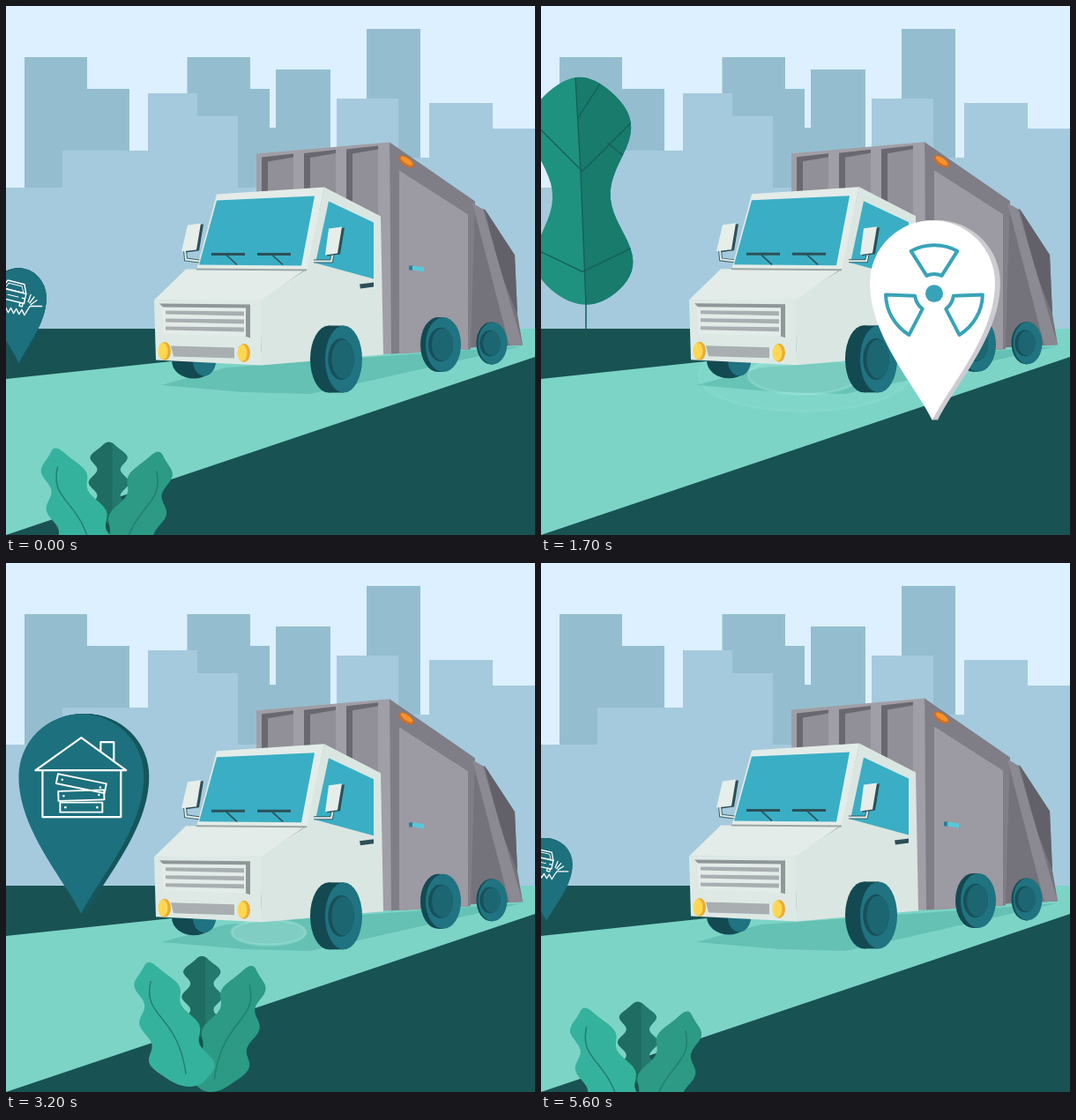
An HTML page with a canvas that plays this animation: 600 px wide and 600 px high, repeating every 5.7 s.

```html
<!DOCTYPE html>
<html lang="en">
<head>
<meta charset="utf-8">
<title>Garbage truck</title>
<style>
html,body{margin:0;width:100%;height:100%;overflow:hidden;background:#dcf0ff}
canvas{display:block;width:600px;height:600px}
</style>
</head>
<body>
<canvas id="stage"></canvas>
<script>
const LOOP = 5700, HALF = LOOP / 2, STEP = 100, TAU = Math.PI * 2;
const cv = document.getElementById('stage'), c = cv.getContext('2d');
const dpr = window.devicePixelRatio || 1;
cv.width = cv.height = 600 * dpr;

// ---------- helpers ----------
const { sin, cos, pow, exp, sqrt, abs, min, max, PI } = Math;
const mod = (a, n) => ((a % n) + n) % n;
const part = (a, b, t) => min(1, max(0, (t - a) / (b - a)));
const ease = (a, b, t) => { const p = part(a, b, t); return p * p * (3 - 2 * p); };
// Time within half a loop, counted from `from`
const phase = (t, from) => mod(t - from, HALF) + from;

function trace(pts, close = true) {
  c.beginPath();
  for (let i = 0; i < pts.length; i += 2) c.lineTo(pts[i], pts[i + 1]);
  if (close) c.closePath();
}
function poly(color, ...pts) { trace(pts); c.fillStyle = color; c.fill(); }
function rect(color, x, y, w, h) { c.fillStyle = color; c.fillRect(x, y, w, h); }
function stroke(color, w) { c.strokeStyle = color; c.lineWidth = w; c.stroke(); }
function line(color, w, ...pts) { trace(pts, false); stroke(color, w); }
function box(color, w, x, y, bw, bh) { c.beginPath(); c.rect(x, y, bw, bh); stroke(color, w); }
function oval(color, x, y, rx, ry = rx) {
  c.beginPath(); c.ellipse(x, y, rx, ry, 0, 0, TAU);
  c.fillStyle = color; c.fill();
}
// Run `fn` in its own coordinates
function at(x, y, sx, sy, fn, turn = 0) {
  c.save(); c.translate(x, y); c.rotate(turn); c.scale(sx, sy); fn(); c.restore();
}
// Leaf outline from top (v = 0) to bottom (v = 1): centre and half width by v
function leaf(color, height, centre, half, round) {
  const N = 48, left = [], right = [];
  for (let i = 0; i <= N; i++) {
    const v = (1 - cos(PI * i / N)) / 2, y = (v - 1) * height;
    const w = half(v) * sqrt(max(0, 1 - pow(2 * v - 1, round)));
    left.push(centre(v) - w, y);
    right.unshift(centre(v) + w, y);
  }
  poly(color, ...left, ...right);
}

// ---------- background ----------
// Steps: each x, y gives the roof height from there on
function skyline(color, ...steps) {
  const pts = [steps[0], 367];
  for (let i = 0; i < steps.length; i += 2)
    pts.push(steps[i], steps[i + 1], steps[i + 2] ?? 600, steps[i + 1]);
  poly(color, ...pts, 600, 367);
}
function scenery() {
  rect('#dcf0ff', 0, 0, 600, 600);
  skyline('#94becf', 21, 58, 92, 94, 140, 215, 205.5, 58, 277, 94, 299, 138, 306, 72, 368, 215, 409, 26, 470, 215);
  skyline('#a5cadd', 0, 206, 64, 164, 161, 99, 217, 125, 263, 206, 375, 105, 445, 172, 480, 110, 552, 139);
  rect('#195253', 0, 366, 600, 234);
  poly('#7cd4c7', 0, 423, 535, 366, 600, 366, 600, 398, 0, 600);
  poly('#65c1b4', 176, 430, 250, 410, 585, 386, 400, 428, 345, 440, 270, 438);
}

// Four waves in a row spread out under the bonnet
function pulses(t) {
  for (let i = 0; i < 4; i++) {
    const age = phase(t, 0) - 50 - 400 * i, life = 1150;
    if (age <= 0 || age >= life) continue;
    const r = age * .14, fade = 1 - age / life;
    c.globalAlpha = .5 * fade * fade;
    oval('#c8f0e8', 298, 419, r, r * .34);
    c.globalAlpha = .4 * fade;
    stroke('#b5eee4', 3);
  }
  c.globalAlpha = 1;
}

// ---------- tree ----------
function tree(t, start, x) {
  const p = part(start, start + 500, t) - 1, q = part(start + 500, start + 970, t);
  const s = (1 + 2 * p * p * p + p * p) * (1 - q * q);
  if (s < .01) return;
  const shape = color => leaf(color, 256, v => -7 + 7 * v * v, v => 47 + 14.5 * cos(TAU * (v - .18) / .68), 4);
  const ink = '#165f5c';
  at(x, 367, s, s, () => {
    line('#1a5c5d', 1.5, 0, -30, 0, 0);
    c.translate(0, -28);
    shape('#1f917f');
    c.clip();
    poly('#187b6c', -12, -260, 70, -260, 70, 0, 0, 0, -6, -150);
    line(ink, 1.4, -12, -258, -6, -150, 0, 0);
    for (const [y, rise] of [[-150, 62], [-37, 30]])
      for (const side of [-1, 1]) line(ink, 1.4, -4, y, side * 62 - 4, y - rise);
    line(ink, 1.4, -9, -210, 20, -255);
    line(ink, 1.4, 24, -182, 54, -158);
  });
}

// ---------- map pins (tip at 0,0) ----------
function pinShape() {
  c.beginPath(); c.moveTo(0, 0);
  c.bezierCurveTo(-18, -38, -71, -95, -71, -156);
  c.arc(0, -156, 71, PI, TAU);
  c.bezierCurveTo(71, -95, 18, -38, 0, 0);
}
function pin(x, y, s, turn, face, side, icon) {
  if (s < .01) return;
  const w = cos(turn), depth = 6 * w - 9 * sin(turn);
  const squeeze = abs(w) < .03 ? .03 : w;
  at(x, y, s, s, () => {
    for (let i = 6; i >= 0; i--) at(depth * i / 6, 0, squeeze, 1, () => {
      pinShape();
      c.fillStyle = i ? side : face; c.fill();
      if (!i) { c.lineCap = c.lineJoin = 'round'; icon(); }
    });
  });
}

function crashIcon() {
  const k = '#fff';
  // tilted car
  at(15, -164, 1, 1, () => {
    box(k, 3.2, -32, -9, 64, 24);
    line(k, 3.2, -32, -9, -23, -30, 21, -30, 32, -9);
    line(k, 2, -25, -10, -18, -24, 17, -24, 25, -10, -25, -10);
    line(k, 2, -14, 3, 14, 3);
    for (const side of [-1, 1]) {
      line(k, 3, side * 24, 3, side * 30, 3);
      box(k, 3, side * 25 - 4, 15, 8, 8);
    }
  }, -.22);
  // broken ground and sparks
  const crack = [-59, -136, -28, -136];
  for (let i = 0; i < 9; i++) crack.push(-21 + 7 * i, (i % 2 ? -114 : -126) - i);
  line(k, 3, ...crack, 48, -134);
  for (let i = 0; i < 3; i++) {
    const a = PI + .6 + .3 * i, x = -18, y = -130;
    line(k, 3, x + 15 * cos(a), y + 18 * sin(a), x + 34 * cos(a), y + 36 * sin(a));
  }
}
function houseIcon() {
  const k = '#fff';
  line(k, 2.2, -52, -163, 0, -200, 51, -163, -52, -163);
  line(k, 2.2, -44, -162, -44, -110, 45, -110, 45, -162);
  line(k, 2.2, 22, -185, 22, -195, 37, -195, 37, -174);
  for (let i = 0; i < 3; i++) at(0, -148 + 13.5 * i, 1, 1, () => {
    const w = 56 - 4 * i;
    box(k, 1.9, -w / 2, -5.5, w, 11);
    for (const side of [-1, 1]) oval(k, side * (w / 2 - 6), 0, 1.3);
  }, [.2, -.03, 0][i]);
}
function hazardIcon() {
  const k = '#38a3b8', spread = .5;
  oval(k, 2, -144, 10);
  for (let i = 0; i < 3; i++) {
    const a = -PI / 2 + i * TAU / 3;
    c.beginPath();
    c.arc(2, -144, 55, a - spread, a + spread);
    c.arc(2, -144, 22, a + spread * .8, a - spread * .8, true);
    c.closePath(); stroke(k, 4);
  }
}
function sprayIcon() {
  const k = '#319fb6';
  box(k, 5, -13, -156, 50, 67);
  line(k, 5, -11, -157, -2, -170, 26, -170, 35, -157);
  rect(k, 2, -186, 20, 13);
  for (let i = 0; i < 4; i++) oval(k, -16 - 8 * i, -181 + 4 * sin(2.4 * i), 5 + 2 * i, 4 + 1.6 * i);
}

// Rolls up along the far kerb in perspective, hops once, then shrinks away
function tealPin(t) {
  const u = phase(t, -700), near = 1 / max(1, 2.1 - u * .00314);
  const q = part(850, 1100, u), hop = part(380, 780, u);
  const x = 85.5 - 135 * (1 - near) + 12 * q, y = 398 + 14 * (1 - near) - 75 * sin(PI * hop);
  const turn = PI * (1 + ease(-100, 350, u)) + TAU * ease(380, 780, u) + 2 * q;
  pin(x, y, near * (1 - q * q), turn, '#1d707d', '#16565c',
    mod(t + 700, LOOP) < HALF ? crashIcon : houseIcon);
}
// Spins in along the near kerb, rests, then spins off
function whitePin(t) {
  const u = phase(t, 765), left = 1 - part(765, 1727, u), q = part(2150, 2600, u);
  const x = 444 - 394 * pow(left, 2.6) + 65 * q * q;
  pin(x, 470 - .357 * (x - 444), (1 - left * left) * (1 - q * q),
    6 * pow(left, 4) + 2.3 * q, '#fff', '#cdccd1',
    mod(t - 765, LOOP) < HALF ? hazardIcon : sprayIcon);
}

// ---------- plant (base at 0,0) ----------
function plantLeaf(color, lean, height, width, grow) {
  leaf(color, height, v => lean * (58 - 46 * v), v => width + grow * v + 5 * cos(TAU * (v - .18) / .32), 4);
  if (!lean) return;
  c.beginPath(); c.moveTo(lean * 56, -height * .85);
  c.bezierCurveTo(lean * 66, -height * .55, lean * 26, -height * .6, lean * 16, -height * .1);
  stroke('#217f76', 1.5);
}
function plant(t) {
  const u = phase(t, -700);
  const x = 110 + .04 * u + 418 / (1 + exp((478 - u) / 106));
  const y = 600 - .46 * (x - 220) + 300 * (1 - ease(-650, -100, u));
  const s = min(1, (640 - x) / 194) * (1 - ease(1200, 1600, u));
  if (s < .01) return;
  at(x, y, s, s, () => {
    at(2, -62, 1, 1, () => {
      plantLeaf('#1f6c63', 0, 92, 18, 0);
      c.clip();
      rect('#24796e', 4, -100, 40, 100);
    });
    plantLeaf('#2c9a85', 1, 143, 19, 17);
    at(0, -6, 1, 1, () => plantLeaf('#35b29d', -1, 141, 19, 20));
  });
}

// ---------- truck ----------
function wheel(x, y, rx, ry, depth) {
  const tread = '#134a52';
  oval(tread, x - depth, y, rx, ry);
  rect(tread, x - depth, y - ry, depth, 2 * ry);
  oval('#207380', x, y, rx, ry);
  oval('#174f5a', x - 3, y, rx * .7, ry * .62);
  oval('#1c6672', x - 1, y, rx * .6, ry * .58);
}
function container() {
  const frame = '#a09ea6', shade = '#7f7d86', deep = '#696870';
  poly('#74737b', 525, 232, 543, 231, 577, 283, 580, 350, 586, 385, 526, 388);
  poly('#62616a', 543, 231, 577, 283, 580, 350, 560, 300);
  poly(frame, 284, 168, 435, 155, 438, 395, 300, 395, 284, 212);
  poly(shade, 435, 155, 532, 222, 527, 390, 437, 395);
  poly('#9c9aa3', 446, 187, 524, 237, 524, 390, 446, 395);
  poly('#8b8992', 529, 224, 541, 231, 586, 385, 571, 386);
  for (let i = 0; i < 3; i++) {
    const x = 290 + 48 * i, y = 172 - 4.5 * i, x2 = x + 36;
    poly(deep, x, y, x2, y - 4, x2, 245, x, 235);
    poly('#918f97', x + 7, y + 5, x2, y, x2, 245, x + 7, 235);
  }
  at(454, 177, 1, 1, () => { oval('#ce6f23', 0, 0, 10, 5); oval('#f6922e', 0, -1, 8, 3); }, .6);
  rect('#2a7f93', 457, 295, 5, 5);
  poly('#58c8d9', 461, 295, 474, 297, 474, 302, 461, 300);
}
function mirror(x, y, lean) {
  const ink = '#2c5058';
  poly(ink, x + 2, y, x + 18, y - 1, x + 13, y + 29, x - 2, y + 31);
  poly('#e6eeea', x, y, x + 15, y - 2, x + 10, y + 28, x - lean, y + 30);
}
function cab() {
  const front = '#dee9e5', side = '#dae6e2', lite = '#e3ece8', glass = '#3aaec4';
  const grey = '#a9afb0', ink = '#2c5058';
  poly(side, 340, 300, 361, 206, 425, 239, 428, 396, 404, 398, 290, 408, 288, 333);
  poly(lite, 239, 214, 361, 206, 341, 300, 216, 300);
  poly(glass, 239, 221, 350, 216, 335, 295, 219, 294);
  poly(lite, 204, 299, 340, 299, 289, 334, 168, 334);
  poly(front, 168, 334, 289, 333, 290, 408, 170, 402);
  line('#9aa5a5', 2, 216, 299, 341, 300);
  poly(glass, 366, 222, 417, 246, 417, 310, 351, 292);
  poly(ink, 401, 316, 417, 314, 417, 319, 402, 321);
  for (const x of [233, 285]) {
    line(ink, 3, x, 282, x + 38, 282);
    line(ink, 1.6, x + 17, 283, x + 29, 294);
  }
  for (const [color, w] of [['#35616a', 4], [lite, 2]]) {
    line(color, w, 203, 277, 204, 288, 219, 290);
    line(color, w, 371, 280, 369, 290, 349, 290);
  }
  mirror(206, 249, 7);
  mirror(366, 253, 4);
  // grille, bumper, lights
  poly('#8f9798', 174, 338, 277, 339, 277, 377, 271, 375, 271, 345, 179, 343);
  poly(lite, 177, 342, 272, 343, 272, 375, 179, 372);
  for (let y = 346; y < 370; y += 9) poly(grey, 181, y, 270, y + 1, 270, y + 6, 181, y + 4);
  poly(grey, 187, 386, 259, 388, 259, 400, 190, 398);
  for (let i = 0; i < 2; i++) {
    oval('#e6ad38', 180 + 90 * i, 392 + 2 * i, 7, 10.5);
    oval('#ffd750', 178 + 90 * i, 392 + 2 * i, 5.5, 9.5);
  }
}
function truck(t) {
  at(0, 1.6 * sin(TAU * t / 570 - .3), 1, 1, () => {
    oval('#134a52', 213, 403, 25, 20);
    oval('#207380', 225, 403, 13, 17);
    container();
    wheel(496, 384.5, 20, 31, 6);
    wheel(552, 383, 16.5, 24, 2);
    cab();
    wheel(383, 401, 21, 38, 17);
  });
}

// ---------- loop ----------
function draw(t) {
  c.setTransform(dpr, 0, 0, dpr, 0, 0);
  scenery();
  tree(t, 1250, 51);
  tree(t, 3530, 57);
  tealPin(t);
  pulses(t);
  truck(t);
  plant(t);
  whitePin(t);
}
let start;
function tick(now) {
  start ??= now;
  draw(Math.floor(mod(now - start, LOOP) / STEP) * STEP);
  requestAnimationFrame(tick);
}
draw(0);
requestAnimationFrame(tick);
</script>
</body>
</html>
```
